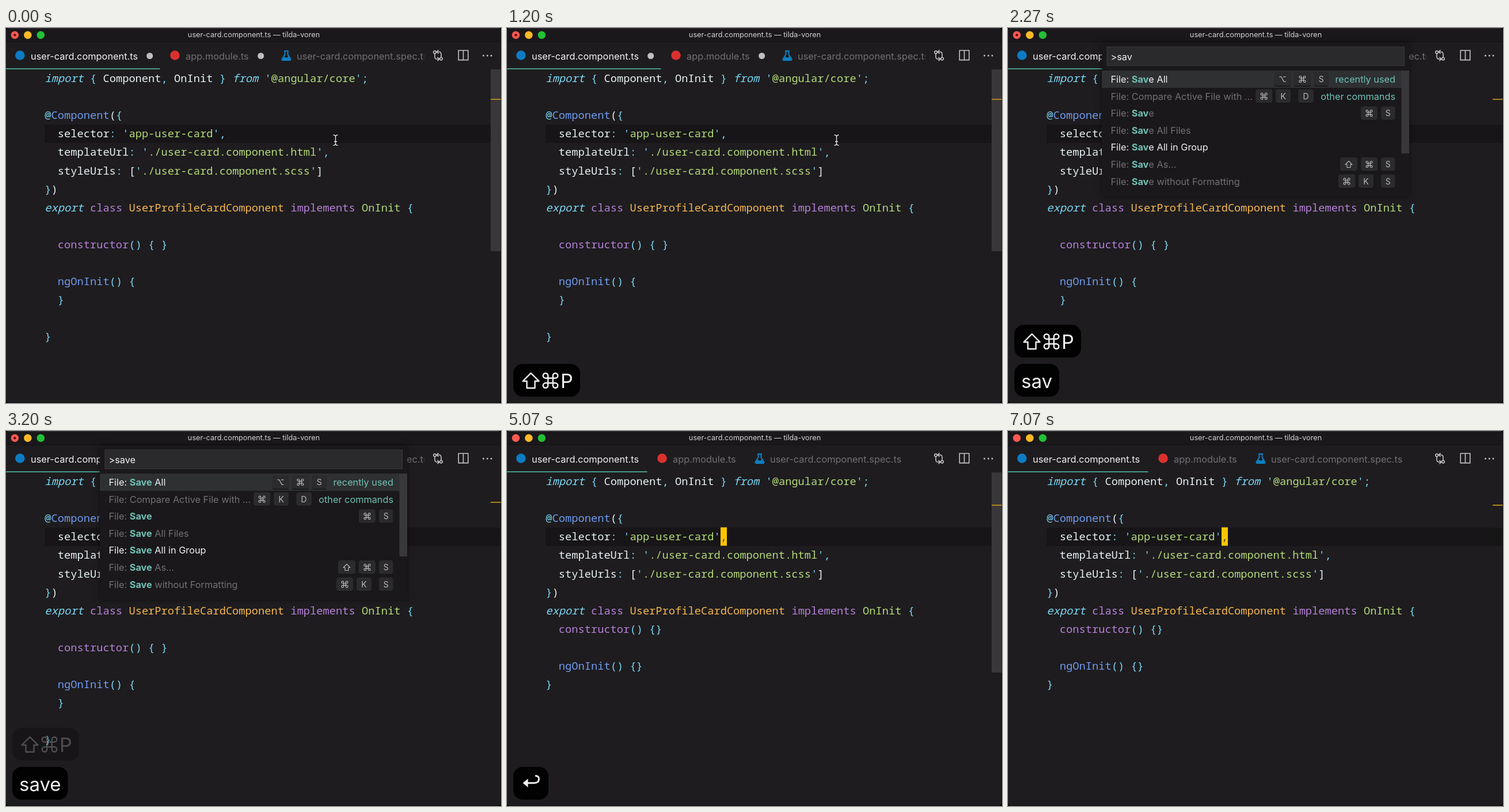
An HTML page with a canvas for the animation above (7140 ms loop, 860x652 px).

```html
<!DOCTYPE html>
<html lang="en">
<head>
<meta charset="utf-8">
<title>Save all editors</title>
<style>
html, body { margin: 0; width: 100%; height: 100%; overflow: hidden; background: #000; }
canvas { display: block; }
</style>
</head>
<body>
<canvas id="stage" width="860" height="652"></canvas>
<script>
const ctx = document.getElementById('stage').getContext('2d');
const LOOP = 7140;
const UI = 'Inter, "Open Sans", sans-serif';
const MONO = '18.73px "Noto Sans Mono", "DejaVu Sans Mono", monospace';
const BG = '#1e1c1f', TEAL = '#6fc2b5', GREY = '#727074', WHITE = '#f2f2f3';

// Moments of the story, in ms
const T = { chord: 1130, open: 1270, keys: [1770, 1960, 2100, 2300], enter: 3800, saved: 4530 };
const LAG = 70;

const INK = { c: '#79d8f3', w: '#e9f3f4', b: '#6f9bef', p: '#b681d8', y: '#f6b84e', g: '#b4da78' };
const HEAD = [
  ['ci', 'import', 'c', ' { ', 'w', 'Component', 'c', ', ', 'w', 'OnInit', 'c', ' } ', 'ci', 'from', 'c', " '", 'g', '@angular/core', 'c', "';"],
  [],
  ['c', '@', 'b', 'Component', 'w', '(', 'c', '{'],
  ['w', '  selector', 'c', ": '", 'g', 'app-user-card', 'c', "',"],
  ['w', '  templateUrl', 'c', ": '", 'g', './user-card.component.html', 'c', "',"],
  ['w', '  styleUrls', 'c', ': ', 'w', '[', 'c', "'", 'g', './user-card.component.scss', 'c', "'", 'w', ']'],
  ['c', '}', 'w', ')'],
  ['ci', 'export', 'p', ' class ', 'y', 'UserProfileCardComponent', 'p', ' implements ', 'g', 'OnInit', 'c', ' {']
];
const DRAFT = [[], ['p', '  constructor', 'c', '() { }'], [], ['b', '  ngOnInit', 'c', '() {'], ['c', '  }'], [], ['c', '}']];
const TIDY = [['p', '  constructor', 'c', '() {}'], [], ['b', '  ngOnInit', 'c', '() {}'], ['c', '}']];

// Each row: label, shortcut (space between keys, slash between chords), note
const RECENT = [
  ['Rename Symbol', 'F2', 'recently used'],
  ['Developer: Reload Window'],
  ['View: Close All Editors', '⌘ K/⌘ W'],
  ['Preferences: Color Theme', '⌘ K/⌘ T'],
  ['File: Open Recent...', '^ R'],
  ['Close Window', '⌘ W'],
  ['View: Toggle Breadcrumbs']
];
const MATCHES = [
  ['File: Save All', '⌥ ⌘ S', 'recently used'],
  ['File: Compare Active File with …', '⌘ K/D', 'other commands'],
  ['File: Save', '⌘ S'],
  ['File: Save All Files'],
  ['File: Save All in Group'],
  ['File: Save As...', '⇧ ⌘ S'],
  ['File: Save without Formatting', '⌘ K/S']
];
const KEY_W = { F2: 30, K: 26, W: 28, D: 27, '⌘': 29, '⌥': 28, '^': 29, '⇧': 30 };

const clamp = v => Math.max(0, Math.min(1, v));
const fade = (t, from, len) => 1 - clamp((t - from) / len);

function rect(x, y, w, h, color) {
  ctx.fillStyle = color;
  ctx.fillRect(x, y, w, h);
}
function round(x, y, w, h, r, color) {
  ctx.fillStyle = color;
  ctx.beginPath();
  ctx.roundRect(x, y, w, h, r);
  ctx.fill();
}
function disc(x, y, r, color) {
  ctx.fillStyle = color;
  ctx.beginPath();
  ctx.arc(x, y, r, 0, 7);
  ctx.fill();
}
function stroke(path, color, width) {
  ctx.strokeStyle = color;
  ctx.lineWidth = width;
  ctx.stroke(new Path2D(path));
}
function text(s, x, y, size, color, align = 'left', weight = 400) {
  ctx.font = `${weight} ${size}px ${UI}`;
  ctx.textAlign = align;
  ctx.fillStyle = color;
  ctx.fillText(s, x, y);
  return ctx.measureText(s).width;
}

// Keyboard symbols, h is half the height
function symbol(ch, x, y, h, color, width) {
  ctx.save();
  ctx.translate(x, y);
  ctx.lineJoin = 'round';
  ctx.strokeStyle = color;
  ctx.lineWidth = width;
  ctx.beginPath();
  if (ch === '⌘') {
    const a = h / 3;
    for (let i = 0; i < 4; i++) {
      ctx.moveTo(-2 * a, a);
      ctx.lineTo(2 * a, a);
      ctx.arc(2 * a, 2 * a, a, -Math.PI / 2, Math.PI);
      ctx.rotate(Math.PI / 2);
    }
  } else if (ch === '⇧') {
    const u = h / 13;
    [[0, -13], [14, 1], [7, 1], [7, 13], [-7, 13], [-7, 1], [-14, 1]].forEach(p => ctx.lineTo(p[0] * u, p[1] * u));
    ctx.closePath();
  } else if (ch === '⌥') {
    ctx.moveTo(-h, -h * .75);
    ctx.lineTo(-h * .4, -h * .75);
    ctx.lineTo(h * .4, h * .75);
    ctx.lineTo(h, h * .75);
    ctx.moveTo(h * .2, -h * .75);
    ctx.lineTo(h, -h * .75);
  } else {
    ctx.moveTo(-h, 0);
    ctx.lineTo(0, -h * .8);
    ctx.lineTo(h, 0);
  }
  ctx.stroke();
  ctx.restore();
}

function drawTitle(saved) {
  rect(0, 0, 860, 24, '#1a181b');
  rect(0, 0, 860, 1, '#343236');
  rect(0, 23.5, 860, 1, '#111012');
  ['#fb5851', '#fdb928', '#22c137'].forEach((c, i) => disc(15.3 + 22.5 * i, 12.3, 6.7, c));
  if (!saved) disc(15.3, 12.3, 2.2, '#5f0906');
  text('user-card.component.ts — tilda-voren', 430.5, 16, 12.7, '#d3d2d4', 'center');
}

function flask(x) {
  ctx.save();
  ctx.translate(x, 48);
  ctx.lineJoin = 'round';
  stroke('M-4 -8H4M-2.5 -8V-2L-7.5 6Q-8 8 -6 8H6Q8 8 7.5 6L2.5 -2V-8', '#0d82c8', 2);
  ctx.fillStyle = '#0d82c8';
  ctx.fill(new Path2D('M-4 2L1 4L3.5 1L7 8H-7Z'));
  ctx.restore();
}

function drawTabs(saved) {
  const gap = saved ? 0 : 24;
  disc(24.3, 47.5, 8.3, '#0d7bc2');
  text('user-card.component.ts', 43, 54.5, 16.35, WHITE);
  disc(270 + gap - 0.5, 47.5, 8.3, '#db302f');
  text('app.module.ts', 288 + gap, 54.5, 16.35, GREY);
  flask(438 + 2 * gap + 1);
  ctx.save();
  ctx.beginPath();
  ctx.rect(0, 25, 726.5, 46);
  ctx.clip();
  text('user-card.component.spec.ts', 457 + 2 * gap, 54.5, 16.35, GREY);
  ctx.restore();
  if (!saved) {
    disc(249.7, 48.5, 5.5, '#bfbec0');
    disc(442.7, 48.5, 5.5, '#bfbec0');
  }
  rect(0, 70, 243.5 + gap, 1.8, '#4aa897');

  const c = '#c3c2c4';
  stroke('M745 44.5V50Q745 54 749 54H752M749.5 50.8L752.7 54L749.5 57.2M756 51V45.5Q756 41.5 752 41.5H749M751.5 38.3L748.3 41.5L751.5 44.7', c, 1.6);
  stroke('M747.3 42a2.3 2.3 0 1 1 -4.6 0a2.3 2.3 0 1 1 4.6 0M758.3 53.5a2.3 2.3 0 1 1 -4.6 0a2.3 2.3 0 1 1 4.6 0', c, 1.6);
  stroke('M786.2 39H802.8V55.6H786.2ZM794.5 39V55.6', c, 1.6);
  [829.5, 836.3, 843].forEach(x => disc(x, 48, 1.5, c));
}

function drawLine(tokens, row) {
  let col = 0;
  ctx.textAlign = 'left';
  for (let i = 0; i < tokens.length; i += 2) {
    const [style, s] = [tokens[i], tokens[i + 1]];
    ctx.font = (style[1] ? 'italic ' : '') + MONO;
    ctx.fillStyle = INK[style[0]];
    ctx.fillText(s, 67.3 + col * 11.24, 94 + row * 32.1);
    col += s.length;
  }
}

function caretOn(t) {
  if (t < T.open) return t % 1000 >= 250 && t % 1000 < 750;
  return t >= T.enter && (t - T.enter) % 1000 < 500;
}

function sliderAlpha(t) {
  if (t < T.enter) return fade(t, T.open, 560);
  return fade(t, 6300, 790);
}

function drawEditor(t, saved) {
  rect(67, 168, 793, 32, '#171517');
  HEAD.concat(saved ? TIDY : DRAFT).forEach(drawLine);
  if (caretOn(t)) {
    rect(371, 167.5, 11, 32, '#fcc402');
    ctx.font = MONO;
    ctx.fillStyle = '#4a4a28';
    ctx.fillText(',', 370.8, 190.3);
  }
  ctx.globalAlpha = sliderAlpha(t);
  rect(842, 72, 18, saved ? 348 : 316, '#39373a');
  ctx.globalAlpha = 1;
  rect(842, saved ? 128 : 123, 18, 2, '#ad8518');
}

function drawPointer() {
  const beam = 'M568.5 186Q572.5 186 572.5 189V201Q572.5 204 568.5 204M576.5 186Q572.5 186 572.5 189M572.5 201Q572.5 204 576.5 204M570 197.5H575';
  stroke(beam, '#0b0a0b', 3.4);
  stroke(beam, '#e4e4e5', 1.5);
}

// Shortcut keys laid out leftwards from the right edge
function drawKeys(shortcut, right, y) {
  let x = right;
  shortcut.split('/').reverse().forEach(chord => {
    chord.split(' ').reverse().forEach(k => {
      const w = KEY_W[k] || 24.5;
      x -= w;
      round(x, y - 12, w, 25, 4, '#151416');
      round(x, y - 12, w, 23.5, 4, '#2b2a2d');
      if ('⌘⌥⇧^'.includes(k)) symbol(k, x + w / 2, y, 5.5, '#b9b8ba', 1.2);
      else text(k, x + w / 2, y + 5, 14, '#b9b8ba', 'center');
      x -= 6;
    });
    x -= 7;
  });
}

function drawLabel(label, match, y, color) {
  const at = match ? label.indexOf(match) : -1;
  if (at < 0) return text(label, 178.5, y, 16.3, color);
  let x = 178.5 + text(label.slice(0, at), 178.5, y, 16.3, color);
  x += text(match, x, y, 16.3, TEAL, 'left', 700);
  text(label.slice(at + match.length), x, y, 16.3, color);
}

function drawPalette(query) {
  ctx.save();
  ctx.shadowColor = 'rgba(0,0,0,.55)';
  ctx.shadowBlur = 9;
  rect(163, 25, 534, 268, '#1a181b');
  ctx.restore();
  rect(171.5, 32.5, 517.5, 33.5, '#3a393c');
  rect(172.5, 33.5, 515.5, 31.5, '#2a292c');
  text('>' + query, 178.5, 56, 16.3, WHITE);

  rect(163, 74, 534, 30, '#2e3032');
  rect(683.5, 74, 13.5, query ? 144 : 27, query ? '#38383b' : '#4a4b4d');
  const match = query && 'S' + query.slice(1);
  (query ? MATCHES : RECENT).forEach(([label, keys, note], i) => {
    const y = 89 + i * 29.6;
    const lit = i === 0 || i === 4;
    drawLabel(label, match, y + 6, lit ? WHITE : GREY);
    let right = 672.5;
    if (note) right -= text(note, 673, y + 6, 16.3, TEAL, 'right') + 11.5;
    if (keys) drawKeys(keys, right, y);
  });
}

function badge(y, w, alpha, paint) {
  if (alpha <= 0) return;
  ctx.save();
  ctx.globalAlpha = alpha;
  round(11, y, w, 57, 16, 'rgba(0,0,0,.93)');
  paint(y);
  ctx.restore();
}

function drawBadges(t, typed) {
  const low = 584, high = 516;
  if (t >= T.chord) {
    badge(t < T.keys[0] ? low : high, 116, t < T.enter ? fade(t, 3000, 270) : 0, y => {
      symbol('⇧', 41.5, y + 29, 13, WHITE, 2.4);
      symbol('⌘', 75.5, y + 29, 12.8, WHITE, 2.4);
      text('P', 93, y + 42, 34, WHITE);
    });
  }
  if (typed) {
    ctx.font = `400 33px ${UI}`;
    const w = ctx.measureText(typed).width + 24;
    badge(t < T.enter ? low : high, w, fade(t, 4500, 270), y => text(typed, 23, y + 42, 33, WHITE));
  }
  if (t >= T.enter) {
    badge(low, 61, fade(t, 5800, 270), y => {
      ctx.translate(0, y);
      stroke('M33 28H47Q55.5 28 55.5 21Q55.5 15.5 49 15.5', WHITE, 2.8);
      ctx.fillStyle = WHITE;
      ctx.fill(new Path2D('M27.5 28L36.5 20.5V35.5Z'));
    });
  }
}

function draw(t) {
  const saved = t >= T.saved;
  const typedAt = time => 'save'.slice(0, T.keys.filter(k => time >= k).length);
  rect(0, 0, 860, 652, '#000');
  ctx.save();
  ctx.beginPath();
  ctx.roundRect(0, 0, 859.5, 651.5, 5);
  ctx.clip();
  rect(0, 0, 860, 652, BG);
  drawTitle(saved);
  drawTabs(saved);
  drawEditor(t, saved);
  if (t < T.open) drawPointer();
  if (t >= T.open && t < T.enter) drawPalette(typedAt(t - LAG));
  drawBadges(t, typedAt(t));
  ctx.restore();
}

const start = performance.now();
function tick() {
  draw((performance.now() - start) % LOOP);
  requestAnimationFrame(tick);
}
tick();
</script>
</body>
</html>
```
